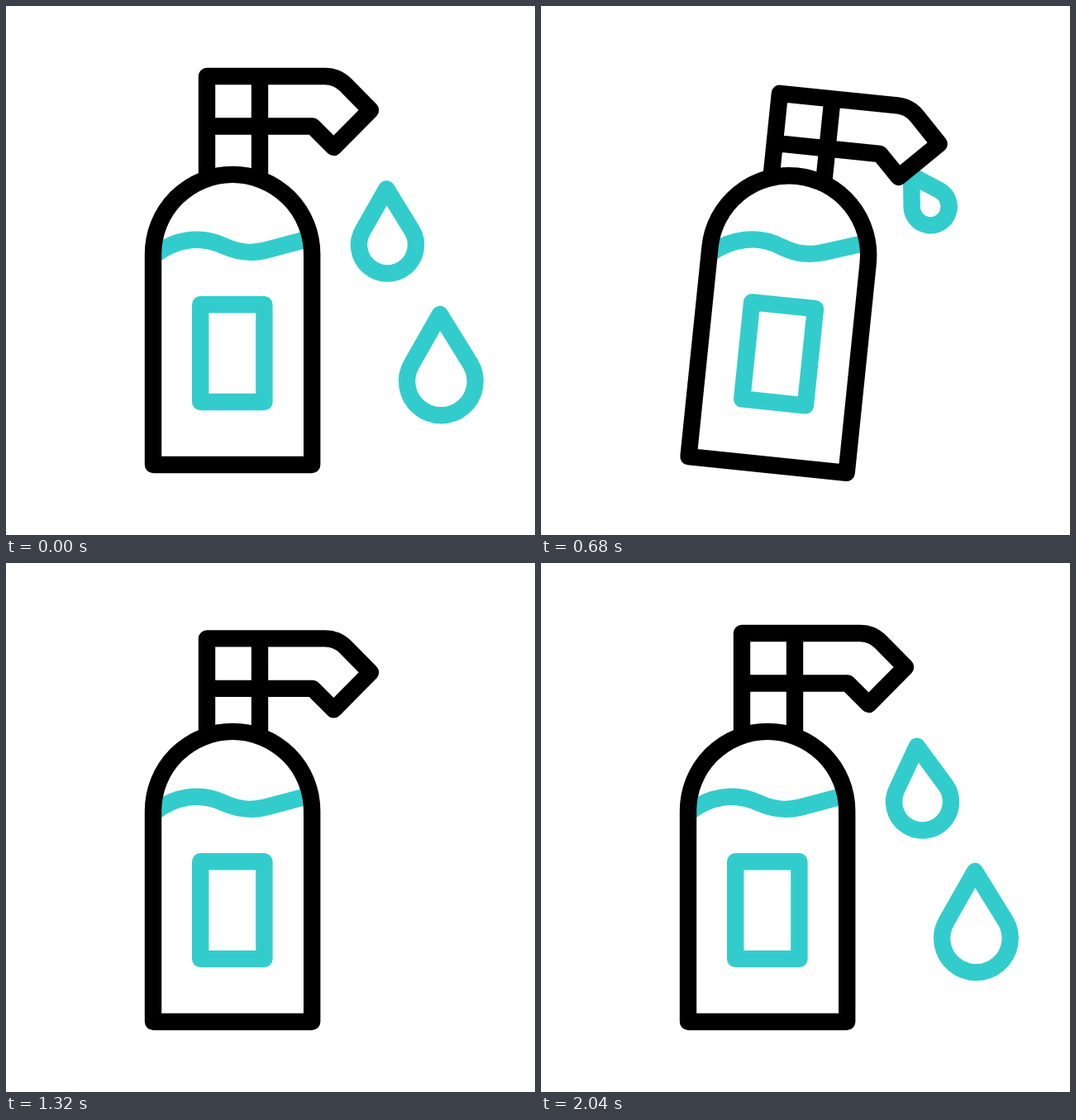
An HTML page with a canvas for the animation above (2.4 s loop, 640x640 px).

```html
<!DOCTYPE html>
<html lang="en">
<head>
<meta charset="utf-8">
<title>Soap dispenser</title>
<style>
html, body { margin: 0; height: 100%; overflow: hidden; background: #fff; }
canvas { display: block; width: 640px; height: 640px; }
</style>
</head>
<body>
<canvas id="stage" width="640" height="640"></canvas>
<script>
const ctx = document.getElementById('stage').getContext('2d');
const LOOP = 2400, TEAL = '#33cccc', BLACK = '#000', FADE = 90, DROP_FALL = 126;
const PIVOT = [274, 555];
const BODY = 'M178 555H370.2V300A96.1 96.1 0 0 0 178 300Z';

const clamp = v => Math.min(1, Math.max(0, v));
const smooth = u => (1 - Math.cos(Math.PI * clamp(u))) / 2;
const rad = deg => deg * Math.PI / 180;

// Point on a Bezier curve of any degree
function bezier(points, u) {
  if (points.length === 1) return points[0];
  return bezier(points.slice(1).map(([x, y], i) => [
    points[i][0] + (x - points[i][0]) * u,
    points[i][1] + (y - points[i][1]) * u
  ]), u);
}

// The bottle swings between turning points [time, degrees]
const swings = [[0, 0], [420, -15.1], [730, 7.2], [930, -5], [1080, 0]];

function tiltAt(t) {
  return swings.slice(1).reduce((tilt, [end, deg], i) => {
    const [start, from] = swings[i];
    return tilt + (deg - from) * smooth((t - start) / (end - start));
  }, 0);
}

// Slow push, short hold, quick release
const push = age => 21.6 * (smooth(age / 330) - clamp((age - 370) / 50));
const pressAt = t => push(t - 350) + push(t - 1200);

// A drop falls from its home, sprays along an arc, then returns home.
// Growing flights start small and turned, and straighten on the way.
function makeDrop(radius, home, fall, spray, back) {
  const floor = [home[0], home[1] + DROP_FALL];
  return {
    radius,
    flights: [
      { ...fall, path: [home, home, floor], fades: true },
      { ...spray, turn: -42, fades: true },
      { ...back, path: [[419, 162], back.via, home], turn: -24, grow: 255 }
    ]
  };
}

const drops = [
  makeDrop(34.5, [461.5, 289],
    { start: 60, time: 465 },
    { start: 750, time: 430, grow: 140, path: [[470, 174], [500, 250], [535, 290], [522, 400]] },
    { start: 1630, time: 410, via: [452, 250] }),
  makeDrop(41.3, [526.4, 454],
    { start: 105, time: 485 },
    { start: 610, time: 490, grow: 130, path: [[456, 188], [488, 300], [545, 522], [526.4, 580]] },
    { start: 1500, time: 440, via: [501, 365] })
];

function line(d, color) {
  ctx.strokeStyle = color;
  ctx.stroke(new Path2D(d));
}

function drawDrop({ radius, flights }, t) {
  const flight = flights.findLast(f => f.start <= t) || flights[0];
  const { start, time, path, grow, turn, fades } = flight;
  const age = Math.max(0, t - start);
  const [x, y] = bezier(path, clamp(age / time));
  const r = radius * (grow ? clamp(age / grow) : 1);
  ctx.save();
  ctx.globalAlpha = clamp(grow ? age / (.4 * grow) : 1) * (fades ? clamp((time - age) / FADE) : 1);
  ctx.translate(x, y);
  if (grow) ctx.rotate(rad(turn * (1 - clamp(age / (2 * grow)))));
  line(`M${-.035 * r} ${-1.96 * r}L${.86 * r} ${-.51 * r}A${r} ${r} 0 1 1 ${-.86 * r} ${-.51 * r}Z`, TEAL);
  ctx.restore();
}

function drawLiquid(tilt) {
  const slope = tilt * (.00098 * tilt - .0169);
  const p = (x, y) => `${x} ${y + slope * (x - 272)} `;
  ctx.save();
  ctx.clip(new Path2D(BODY));
  line('M' + p(170, 307) + 'L' + p(178, 302.5) +
    'C' + p(203, 282) + p(235, 276.5) + p(264, 290.5) +
    'C' + p(283, 299) + p(298, 299.5) + p(314, 295.5) + 'L' + p(376, 279), TEAL);
  ctx.restore();
}

function drawPump(down) {
  const foot = 207 - down;
  ctx.save();
  ctx.translate(0, down);
  line(`M243 ${foot}V85H386C396 85 404 88.5 411 95.5L441 126L396.5 171L371 145.5H243M307 85V${foot}`, BLACK);
  ctx.restore();
}

function draw(t) {
  const tilt = tiltAt(t);
  ctx.clearRect(0, 0, 640, 640);
  ctx.lineWidth = 20.4;
  ctx.lineJoin = 'round';
  drops.forEach(drop => drawDrop(drop, t));
  ctx.save();
  ctx.translate(...PIVOT);
  ctx.rotate(rad(tilt));
  ctx.translate(-PIVOT[0], -PIVOT[1]);
  drawLiquid(tilt);
  line('M235.2 361.3H312.4V479H235.2Z', TEAL);
  drawPump(pressAt(t));
  line(BODY, BLACK);
  ctx.restore();
}

function tick() {
  draw(performance.now() % LOOP);
  requestAnimationFrame(tick);
}
tick();
</script>
</body>
</html>
```
